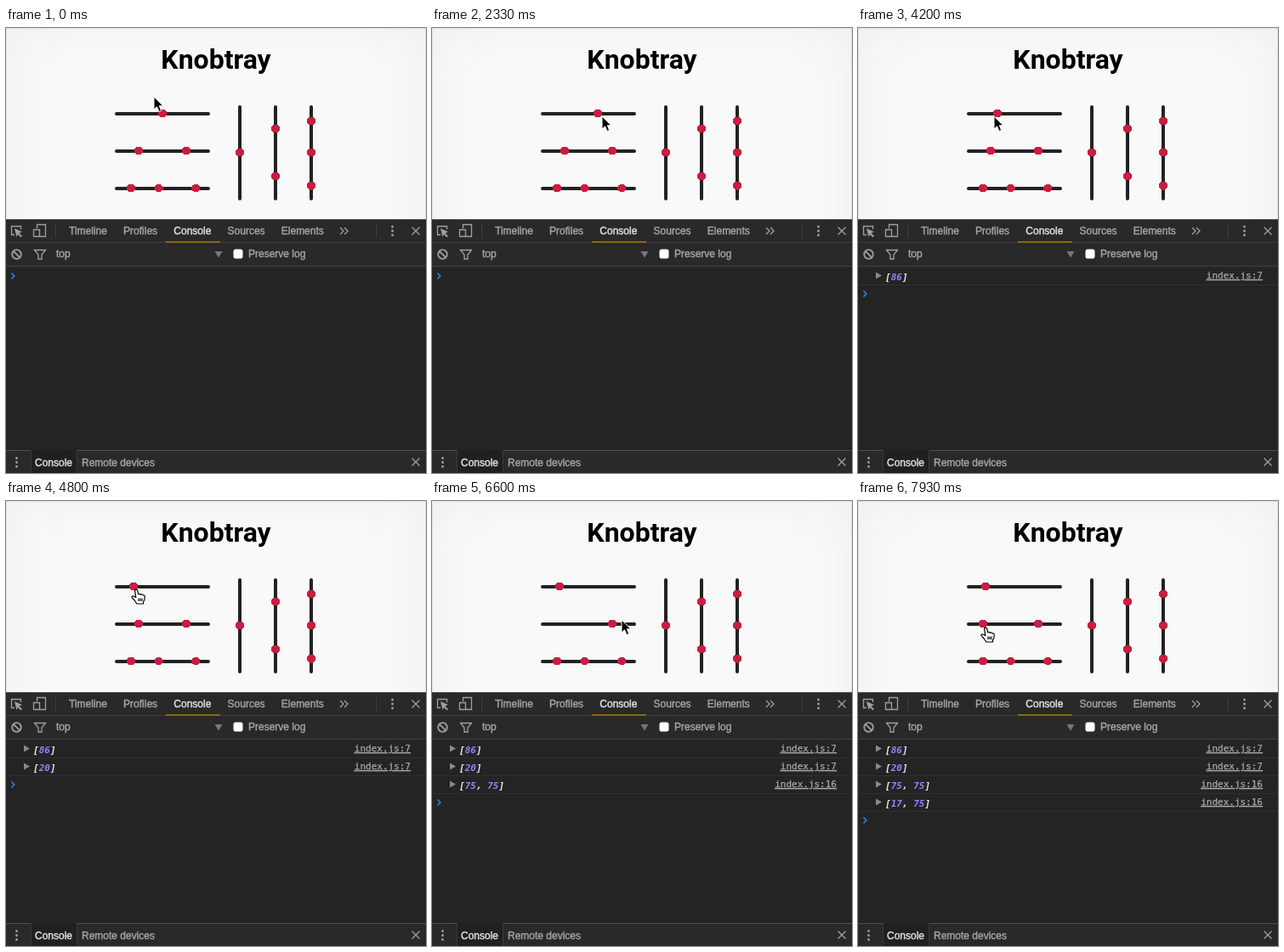
An HTML page for the animation above (8000 ms loop, 494 px wide and 524 px high).

```html
<!DOCTYPE html>
<html lang="en">
<head>
<meta charset="utf-8">
<title>Knobtray</title>
<style>
  html, body { margin: 0; width: 100%; height: 100%; overflow: hidden; background: #242424; }
  #page { position: absolute; left: 0; top: 0; width: 494px; height: 524px; background: #f9f9f9;
    box-shadow: inset 0 0 0 1px #e2e2e2, inset 0 0 50px #ededed; }
  svg { position: absolute; left: 0; top: 0; }
  .ui { font: 12px "Liberation Sans", Arial, sans-serif; fill: #a5a5a5; stroke: #a5a5a5; stroke-width: .4; }
  .ui .on { fill: #e4e4e4; stroke: #e4e4e4; }
  .icon { fill: none; stroke: #a0a0a0; stroke-width: 1.3; }
  .solid { fill: #a0a0a0; }
  .track { stroke: #222; stroke-width: 4; stroke-linecap: round; }
  .knob { fill: #c91d42; shape-rendering: crispEdges; }
  .log { font: 11px "DejaVu Sans Mono", monospace; }
  .value { font-weight: bold; font-style: italic; fill: #e8e8e8; }
  .value tspan { fill: #9980ff; }
  .link { fill: #aaa; stroke: #aaa; stroke-width: .25; text-decoration: underline; text-anchor: end; }
  .hand { fill: #fff; stroke: #000; stroke-width: 1.2; }
</style>
</head>
<body>
<div id="page"></div>
<svg width="494" height="524" viewBox="0 0 494 524">
  <text x="247" y="48" text-anchor="middle" font-family="Roboto, sans-serif" font-weight="700" font-size="32">Knobtray</text>
  <g id="sliders"></g>

  <path d="M0 225H494V524H0Z" fill="#242424"/>
  <path d="M0 225H494V280H0ZM0 498H494V524H0Z" fill="#292929"/>
  <path d="M0 225.5H494M0 497.5H494" stroke="#505050"/>
  <path d="M0 252.5H494M0 280.5H494M58.5 232V247M435.5 232V247" stroke="#404040"/>
  <path d="M188 252H252" stroke="#a8780f" stroke-width="1.6"/>
  <path d="M29.5 497V525H83.5V497" fill="#202020" stroke="#393939"/>

  <g class="icon">
    <path d="M10 243.5H6.5V233.5H17.5V237"/>
    <path d="M36.5 236V231.5H46.5V245.5H40M32.5 237.5H39.5V245.5H32.5Z"/>
    <path d="M393 235l4 4-4 4m5-8l4 4-4 4"/>
    <path id="close" d="M477.5 234.5l9 9m0-9l-9 9"/>
    <use href="#close" y="272"/>
    <g stroke-width="1.8"><circle cx="12.5" cy="266.5" r="5.3"/><path d="M8.8 262.8l7.4 7.4"/></g>
    <path d="M33.5 261.5H46.5L42 267V272H38V267Z"/>
  </g>
  <path class="solid" d="M10 236l9 4-3.5 1.5 3.5 3.5-1.5 1.5-3.5-3.5-1.5 3Z"/>
  <path d="M245.5 263h9l-4.5 7.5Z" fill="#777"/>
  <rect x="267.5" y="260.5" width="11" height="11" rx="2.5" fill="#fff"/>
  <g stroke="#a0a0a0" stroke-width="2.8" stroke-linecap="round" stroke-dasharray="0 5">
    <path d="M454.5 234v10.1M12.5 506.5v10.1"/>
  </g>

  <g class="ui">
    <text x="74" y="243">Timeline<tspan dx="19.2">Profiles</tspan><tspan dx="19.2" class="on">Console</tspan><tspan dx="19.2">Sources</tspan><tspan dx="19.2">Elements</tspan></text>
    <text x="59" y="270">top</text>
    <text x="285" y="270">Preserve log</text>
    <text x="34" y="516" class="on">Console</text>
    <text x="89" y="516">Remote devices</text>
  </g>
  <g id="logs"></g>
  <path id="prompt" d="M6.5 288.5l3.3 3.5-3.3 3.5" fill="none" stroke="#367cf1" stroke-width="1.6"/>

  <g id="cursor" stroke-linejoin="round">
    <path id="arrow" d="M0 0V15L3.5 11.8 6 17.6 8.7 16.4 6.3 10.8H11Z" stroke="#fff"/>
    <path id="point" class="hand" d="M-.5 1.2Q1-.8 2.5 1L3.8 5.8Q5.5 4.8 6.6 6.3 8.2 5.3 9.2 7 11 6.4 11.3 9L10.8 12.5 9.5 15V17H1.8L-.8 13-4 9.6Q-4 7.3-1.6 8.2L.8 9.6ZM4 10.5V14M6 10.5V14M8 10.5V14"/>
    <path id="grab" class="hand" d="M-3.5 8.5L-5.5 4.5-8-.2Q-7-2.5-4.8 0L-6.5-5Q-5.5-7.8-3.5-5.3L-2-1.5-1.7-7Q0-9 1.4-7L1.8-2 3-6Q5-7.6 5.8-5.2L5 0 6.3-2.5Q8.3-3 7.8 0L6 5 5 8.5ZM-2-1.5V1M1.8-2V1M5 0L4.5 1.5"/>
  </g>
</svg>
<script>
const LOOP = 8000, STEP = 1000 / 15;
const LEFT = 128, TOP = 91, LENGTH = 112, ROW = 21;
const TRAVEL = 400, REST = 140, LOG_DELAY = 130, GRIP = 2;
const $ = id => document.getElementById(id);

function add(parent, tag, attrs, html = "") {
  const node = document.createElementNS("http://www.w3.org/2000/svg", tag);
  for (const key in attrs) node.setAttribute(key, attrs[key]);
  node.innerHTML = html;
  return parent.appendChild(node);
}

function ease(p) {
  p = Math.min(1, Math.max(0, p));
  return p * p * (3 - 2 * p);
}
const mix = (a, b, p) => a + (b - a) * p;
const toPixels = percent => LEFT + LENGTH * percent / 100;
const toPercent = x => Math.round((x - LEFT) / LENGTH * 100);

function addSlider(vertical, index, percents) {
  const across = vertical ? 275 + 42 * index : 101 + 44 * index;
  const [along, cross] = vertical ? ["y", "x"] : ["x", "y"];
  const start = vertical ? TOP : LEFT;
  add($("sliders"), "line", {
    class: "track", [along + 1]: start + 2, [along + 2]: start + LENGTH - 2,
    [cross + 1]: across, [cross + 2]: across
  });
  const knobs = percents.map(percent => add($("sliders"), "ellipse", {
    class: "knob", rx: 5.2, ry: vertical ? 5 : 4.7,
    ["c" + along]: start + LENGTH * percent / 100 - vertical * .5,
    ["c" + cross]: across - !vertical * .5
  }));
  return { y: across, percents, knob: knobs[0], limit: toPixels(percents[1] ?? 100) };
}

const [single, double] = [[50], [25, 75], [17, 46, 85]].map((p, i) => addSlider(false, i, p));
[[50], [25, 75], [17, 50, 85]].forEach((p, i) => addSlider(true, i, p));

// "to" is the pull on the knob in pixels; the neighbouring knob may stop it earlier.
const drags = [
  { slider: single, start: 1930, end: 2930, to: 224, y: 104 },
  { slider: single, start: 3500, end: 4375, to: 150, y: 104 },
  { slider: double, start: 5670, end: 6270, to: 221, y: 140 },
  { slider: double, start: 7150, end: 7540, to: 147, y: 149 }
];

drags.forEach((drag, i) => {
  const { slider, to } = drag, y = 292 + ROW * i;
  const values = [toPercent(Math.min(to, slider.limit)), ...slider.percents.slice(1)];
  drag.row = add($("logs"), "g", { class: "log" });
  add(drag.row, "path", { d: `M21 ${y - 4.5}l7 4 -7 4Z`, fill: "#8a8a8a" });
  add(drag.row, "text", { class: "value", x: 32, y: y + 5 },
    `[${values.map(v => `<tspan>${v}</tspan>`).join(", ")}]`);
  add(drag.row, "text", { class: "link", x: 476, y: y + 3 }, `index.js:${slider === single ? 7 : 16}`);
  add(drag.row, "path", { d: `M0 ${y + 10.5}H494`, stroke: "#303030" });
});

function draw(t) {
  let x = 174, y = 81, shown = 0;
  for (const slider of [single, double]) slider.x = toPixels(slider.percents[0]);

  for (const { slider, start, end, to, y: gripY, row } of drags) {
    const approach = ease((t - start + TRAVEL + REST) / TRAVEL);
    const pull = time => ease((time - start) / (end - start));
    x = mix(mix(x, slider.x + GRIP, approach), to + GRIP, pull(t));
    y = mix(y, gripY, approach);
    // The knob trails the pointer by one step.
    slider.x = Math.min(slider.limit, mix(slider.x, to, pull(t - STEP)));

    const logged = t >= end + LOG_DELAY;
    row.style.display = logged ? "" : "none";
    shown += logged;
  }

  for (const slider of [single, double]) slider.knob.setAttribute("cx", Math.round(slider.x));
  $("prompt").setAttribute("transform", `translate(0 ${ROW * shown})`);

  const hovering = [single, double].some(s => Math.abs(x - GRIP - s.x) < 3 && Math.abs(y - s.y) < 6);
  const mode = hovering ? "point" : t > 1200 && t < 1600 ? "grab" : "arrow";
  for (const id of ["arrow", "point", "grab"]) $(id).style.display = id === mode ? "" : "none";
  $("cursor").setAttribute("transform", `translate(${Math.round(x)} ${Math.round(y)})`);
}

function tick() {
  const t = performance.now() % LOOP;
  draw(Math.floor((t + 5) / STEP) * STEP % LOOP);
  requestAnimationFrame(tick);
}
tick();
</script>
</body>
</html>
```
